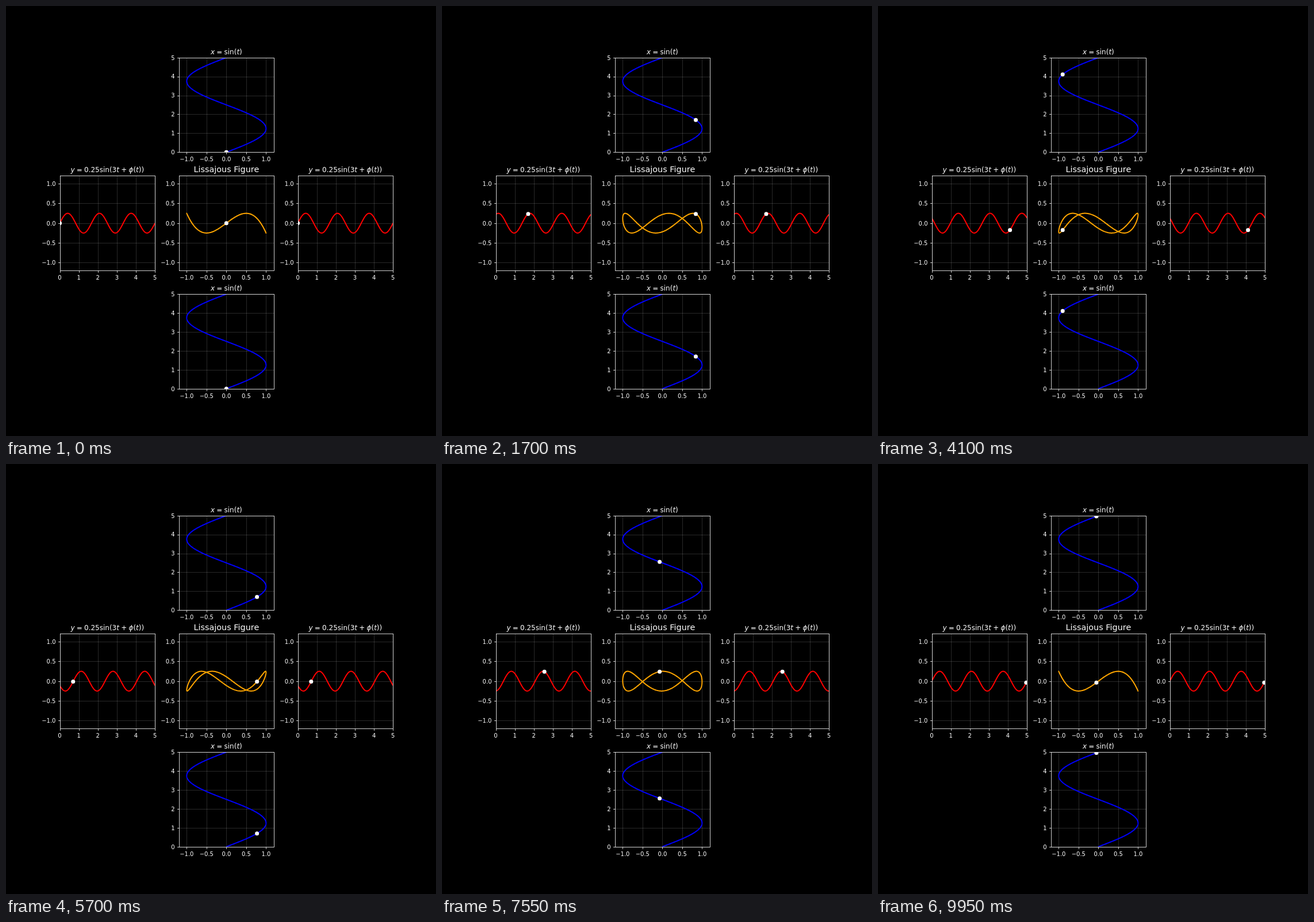
An HTML page that plays this animation: 748x748 px, repeating every 10 s.

```html
<!DOCTYPE html>
<html lang="en">
<head>
<meta charset="utf-8">
<title>Lissajous Figure</title>
<style>
  html, body { margin: 0; width: 100%; height: 100%; overflow: hidden; background: #000; }
  svg { display: block; width: 748px; height: 748px; }
  text { font-family: "DejaVu Sans", sans-serif; font-size: 10px; fill: #fff; }
  .math { font-size: 12px; }
  .math i, .it { font-style: italic; }
  .head { font-size: 14.4px; }
  .grid { stroke: #fff; stroke-opacity: .2; stroke-width: .8; fill: none; }
  .axis { stroke: #fff; stroke-width: .8; fill: none; }
  .curve { stroke-width: 2; fill: none; stroke-linejoin: round; }
  .dot { fill: #fff; }
</style>
</head>
<body>
<svg id="stage" viewBox="0 0 748 748"></svg>
<script>
const TAU = Math.PI * 2;
const SPAN = 5, FRAMES = 200, STEP = 50;
const W = 165.63, H = 164.56;
const COLS = [93.5, 300.54, 507.57];
const ROWS = [89.76, 295.46, 501.16];
const svg = document.getElementById('stage');

const time = { min: 0, max: SPAN, ticks: [0, 1, 2, 3, 4, 5], digits: 0 };
const wave = { min: -1.2, max: 1.2, ticks: [-1, -0.5, 0, 0.5, 1], digits: 1 };

const xAt = t => Math.sin(TAU * t / SPAN);
const yAt = (t, phi) => 0.25 * Math.sin(3 * TAU * t / SPAN + phi);
const snap = v => Math.floor(v + 0.5) + 0.5;

const it = s => `<tspan class="it">${s}</tspan>`;
const op = (s, next) => `<tspan dx="3.2">${s}</tspan><tspan dx="3.2">${next}</tspan>`;
const X_TITLE = it('x') + op('=', 'sin(') + it('t') + ')';
const Y_TITLE = it('y') + op('=', '0.25sin(3') + it('t') +
  '<tspan dx="3.2">+</tspan><tspan dx="3.2" class="it">ϕ</tspan>(' + it('t') + '))';

function add(parent, name, attrs, html) {
  const el = document.createElementNS('http://www.w3.org/2000/svg', name);
  for (const key in attrs) el.setAttribute(key, attrs[key]);
  if (html) el.innerHTML = html;
  parent.appendChild(el);
  return el;
}

function label(value, digits) {
  return value.toFixed(digits).replace('-', '\u2212');
}

function makePanel(col, row, xAxis, yAxis, title, cls, color, point) {
  const left = COLS[col], top = ROWS[row];
  const right = left + W, bottom = top + H;
  const px = v => left + (v - xAxis.min) / (xAxis.max - xAxis.min) * W;
  const py = v => bottom - (v - yAxis.min) / (yAxis.max - yAxis.min) * H;
  const x0 = snap(left), x1 = snap(right), y0 = snap(top), y1 = snap(bottom);

  let grid = '', ticks = '';
  for (const v of xAxis.ticks) {
    const x = snap(px(v));
    grid += `M${x} ${y0}V${y1}`;
    ticks += `M${x} ${y1}v3.5`;
    add(svg, 'text', { x: px(v), y: Math.round(bottom + 15.8), 'text-anchor': 'middle' },
      label(v, xAxis.digits));
  }
  for (const v of yAxis.ticks) {
    const y = snap(py(v));
    grid += `M${x0} ${y}H${x1}`;
    ticks += `M${x0} ${y}h-3.5`;
    add(svg, 'text', { x: left - 7, y: Math.round(py(v) + 3.8), 'text-anchor': 'end' },
      label(v, yAxis.digits));
  }
  add(svg, 'text', {
    class: cls, x: left + W / 2, y: Math.round(top - 6), 'text-anchor': 'middle'
  }, title);

  const id = `clip${col}${row}`;
  const clip = add(svg, 'clipPath', { id });
  add(clip, 'rect', { x: x0 - 0.5, y: y0 - 0.5, width: x1 - x0, height: y1 - y0 });
  add(svg, 'path', { class: 'grid', d: grid });
  const plot = add(svg, 'g', { 'clip-path': `url(#${id})` });
  const curve = add(plot, 'path', { class: 'curve', stroke: color });
  const dot = add(plot, 'circle', { class: 'dot', r: 3.5 });
  add(svg, 'rect', { class: 'axis', x: x0, y: y0, width: x1 - x0, height: y1 - y0 });
  add(svg, 'path', { class: 'axis', d: ticks });

  return (t, phi) => {
    const pts = [];
    for (let i = 0; i <= 300; i++) {
      const [x, y] = point(SPAN * i / 300, phi);
      pts.push(px(x).toFixed(2) + ' ' + py(y).toFixed(2));
    }
    curve.setAttribute('d', 'M' + pts.join('L'));
    const [x, y] = point(t, phi);
    dot.setAttribute('cx', px(x));
    dot.setAttribute('cy', py(y));
  };
}

const across = t => [xAt(t), t];
const along = (t, phi) => [t, yAt(t, phi)];
const figure = (t, phi) => [xAt(t), yAt(t, phi)];

const panels = [
  makePanel(1, 0, wave, time, X_TITLE, 'math', '#00f', across),
  makePanel(0, 1, time, wave, Y_TITLE, 'math', '#f00', along),
  makePanel(1, 1, wave, wave, 'Lissajous Figure', 'head', '#ffa500', figure),
  makePanel(2, 1, time, wave, Y_TITLE, 'math', '#f00', along),
  makePanel(1, 2, wave, time, X_TITLE, 'math', '#00f', across)
];

let shown = -1;
function draw(ms) {
  const k = Math.floor(ms / STEP) % FRAMES;
  if (k === shown) return;
  shown = k;
  // The dot walks every fifth of 500 samples; the phase makes one full turn per loop.
  const t = (k * 5 % 500) * SPAN / 499;
  const phi = TAU * k / (FRAMES - 1);
  for (const update of panels) update(t, phi);
}

draw(0);
const start = performance.now();
(function tick() {
  draw(performance.now() - start);
  requestAnimationFrame(tick);
})();
</script>
</body>
</html>
```
